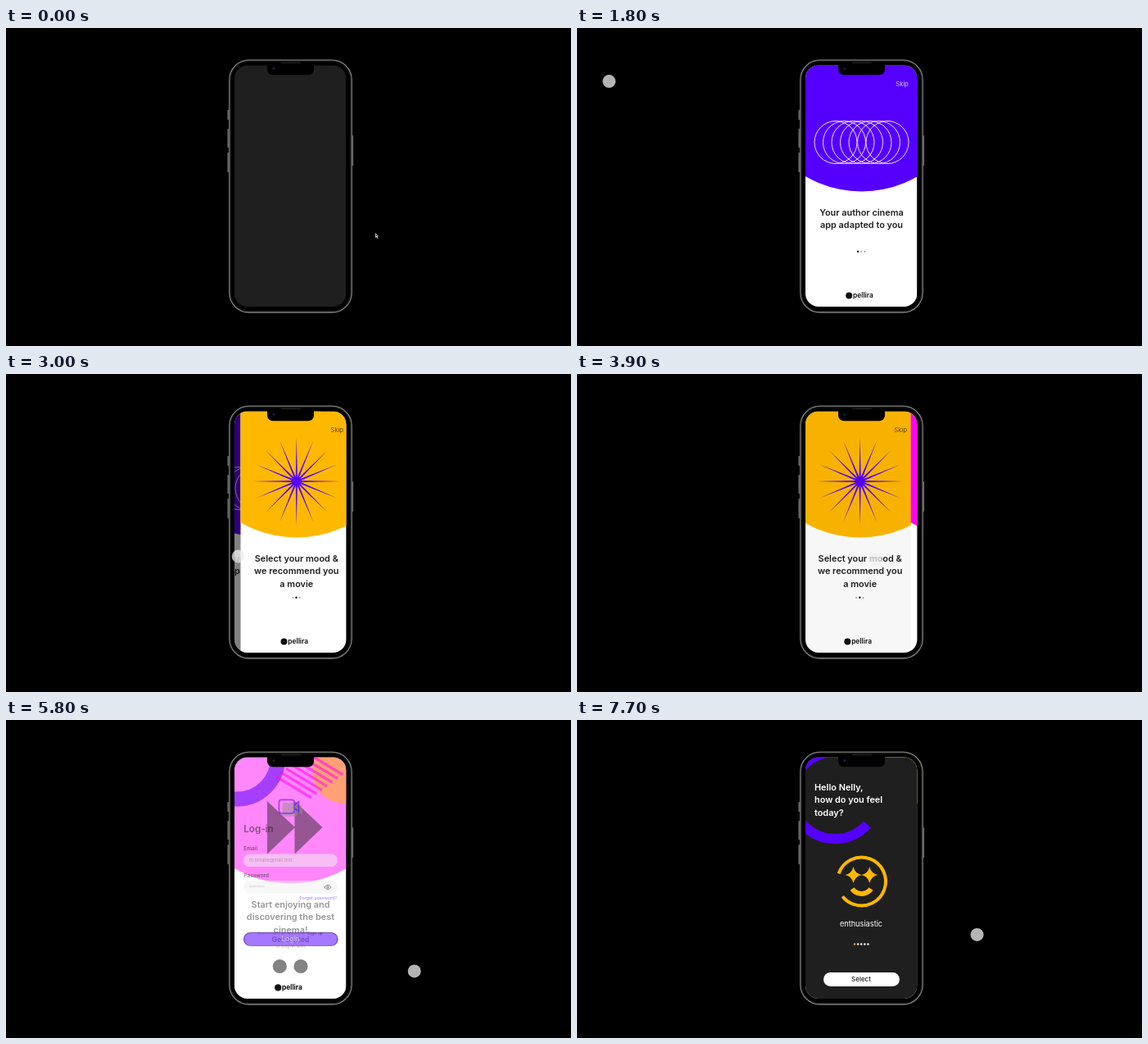
These frames come from a looping animation (690x388 px, 8 s). An HTML page with a canvas:

```html
<!DOCTYPE html>
<html lang="en">
<head>
<meta charset="utf-8">
<title>App walkthrough</title>
<style>
html, body { margin: 0; width: 100%; height: 100%; overflow: hidden; background: #000; }
canvas { display: block; width: 690px; height: 388px; }
</style>
</head>
<body>
<canvas id="stage"></canvas>
<script>
const canvas = document.getElementById('stage');
const c = canvas.getContext('2d');
const dpr = window.devicePixelRatio || 1;
canvas.width = 690 * dpr;
canvas.height = 388 * dpr;

const LOOP = 8000, MID = 347.5, BRAND = 'pellira';
const DARK = '#1f1f1f', VIOLET = '#5500ff', YELLOW = '#ffb800', PINK = '#ff00f5';
const SCREEN = { x: 279, y: 45.5, w: 136.4, h: 294.5 };

const clamp = v => Math.min(1, Math.max(0, v));
const lerp = (a, b, p) => a + (b - a) * p;
const smooth = v => { v = clamp(v); return v * v * (3 - 2 * v); };
const easeOut = v => 1 - (1 - clamp(v)) ** 2;
const rad = deg => deg * Math.PI / 180;
const grey = v => `rgb(${Math.round(v)},${Math.round(v)},${Math.round(v)})`;

function text(str, x, y, size, { color = DARK, weight = 500, align = 'center' } = {}) {
  c.font = `${weight} ${size}px Inter, sans-serif`;
  c.textAlign = align;
  c.fillStyle = color;
  c.fillText(str, x, y + size * 0.36);
}
function heading(list, x, y, style) {
  list.forEach((s, i) => text(s, x, y + i * 15.8, 10.9, { weight: 600, ...style }));
}
function disc(x, y, r, color) {
  c.beginPath();
  c.arc(x, y, r, 0, 7);
  c.fillStyle = color;
  c.fill();
}
function arc(x, y, r, from, to, width, color) {
  c.beginPath();
  c.arc(x, y, r, rad(from), rad(to));
  c.lineWidth = width;
  c.strokeStyle = color;
  c.stroke();
}
function box(x, y, w, h, r, fill, stroke, width = 1) {
  c.beginPath();
  c.roundRect(x, y, w, h, r);
  if (fill) { c.fillStyle = fill; c.fill(); }
  if (stroke) { c.lineWidth = width; c.strokeStyle = stroke; c.stroke(); }
}
function poly(points, fill) {
  c.beginPath();
  points.forEach(([x, y]) => c.lineTo(x, y));
  c.closePath();
  c.fillStyle = fill;
  c.fill();
}
function star(x, y, tips, outer, inner, fill) {
  const pts = [];
  for (let i = 0; i < tips * 2; i++) {
    const a = Math.PI * i / tips, r = i % 2 ? inner : outer;
    pts.push([x + r * Math.cos(a), y + r * Math.sin(a)]);
  }
  poly(pts, fill);
}
function faded(alpha, draw) {
  if (alpha <= 0) return;
  c.save();
  c.globalAlpha = Math.min(1, alpha);
  draw();
  c.restore();
}
function fillScreen(color) {
  c.fillStyle = color;
  c.fillRect(SCREEN.x, SCREEN.y, SCREEN.w, SCREEN.h);
}

// Onboarding pages
const dome = color => disc(MID, 62.4, 137, color);
const skip = color => text('Skip', 397, 68.5, 7.8, { color, weight: 300 });
function dots(active) {
  for (let i = 0; i < 3; i++) disc(343 + i * 4.2, 272.8, i === active ? 1.2 : 0.9, i === active ? '#111' : '#888');
}
function footer() {
  disc(332.2, 326.5, 4, '#111');
  text(BRAND, 337, 326.3, 8.4, { weight: 600, color: '#111', align: 'left' });
}

function circlesPage() {
  dome(VIOLET);
  skip('#fff');
  for (let i = 0; i < 7; i++) arc(316 + i * 10.5, 139.5, 26, 0, 360, 0.9, '#fff');
  heading(['Your author cinema', 'app adapted to you'], MID, 224.7);
  dots(0);
}
function burstPage() {
  fillScreen('#fff');
  dome(YELLOW);
  skip('#3a2a00');
  star(MID, 131, 16, 54, 5.5, VIOLET);
  heading(['Select your mood &', 'we recommend you', 'a movie'], MID, 224.7);
  dots(1);
  footer();
}
function forwardPage() {
  fillScreen('#fff');
  dome(PINK);
  for (const x of [319, 352.5]) poly([[x, 99], [x + 34, 131], [x, 163.5]], DARK);
  heading(['Start enjoying and', 'discovering the best', 'cinema!'], MID, 224.7);
  box(290.5, 259.5, 114.5, 16, 8, '#fff', '#111', 1.2);
  text('Get started', MID, 267.7, 8.4, { weight: 600 });
  footer();
}

// Log-in page
function camera() {
  const body = (x, y) => {
    c.beginPath();
    c.roundRect(x, y, 18.5, 16.5, 3);
    c.moveTo(x + 18.5, y + 6.5);
    c.lineTo(x + 24, y + 2);
    c.lineTo(x + 24, y + 14.5);
    c.lineTo(x + 18.5, y + 10);
  };
  body(337.5, 101);
  c.fillStyle = '#929292';
  c.fill();
  body(333.5, 97.3);
  c.lineWidth = 1.7;
  c.lineJoin = 'round';
  c.strokeStyle = VIOLET;
  c.stroke();
}
function eye(x, y) {
  c.beginPath();
  c.moveTo(x - 4, y);
  c.quadraticCurveTo(x, y - 5.6, x + 4, y);
  c.quadraticCurveTo(x, y + 5.6, x - 4, y);
  c.lineWidth = 0.9;
  c.strokeStyle = '#222';
  c.stroke();
  arc(x, y, 1.3, 0, 360, 0.9, '#222');
}
function stripes() {
  c.lineWidth = 3.4;
  c.strokeStyle = PINK;
  for (let i = 0; i < 7; i++) {
    const x = 329 + i * 6.4, y = 68.5 - i * 4.7;
    c.beginPath();
    c.moveTo(x, y);
    c.lineTo(x + 44, y + 26.5);
    c.stroke();
  }
}
function field(label, y) {
  text(label, 290.3, y - 14.2, 6.5, { align: 'left', weight: 600 });
  box(290, y - 7.75, 115, 15.5, 7.75, '#f0f0f0');
}
function loginPage(buttonY) {
  const note = { color: '#777', weight: 400 };
  arc(282, 46.5, 50, 0, 180, 18, VIOLET);
  disc(413, 63, 39, YELLOW);
  stripes();
  camera();
  text('Log-in', 290.3, 133, 11.6, { align: 'left', weight: 600 });
  field('Email', 171.2);
  text('m.orvane@mail.test', 297, 171.2, 5.6, { ...note, align: 'left' });
  field('Password', 203.7);
  for (let i = 0; i < 8; i++) disc(298 + i * 2.4, 203, 0.75, '#888');
  eye(393, 204);
  text('Forget password?', 404, 217.5, 5.4, { align: 'right', color: VIOLET, weight: 400 });
  text('Don\u2019t have an account?', 366, 260, 5.3, { ...note, align: 'right' });
  text('Sign up', 367.8, 260, 5.4, { align: 'left', color: '#111' });
  text('or Log-in with', MID, 276.3, 5.4, note);
  box(290, buttonY - 8, 115.5, 16, 8, VIOLET);
  text('Login', MID, buttonY, 8.4, { color: '#fff', weight: 600 });
  disc(334.3, 300.5, 8.6, '#161616');
  disc(360, 300.5, 8.6, '#161616');
}

// Mood picker
function sparkle(x, y, r) {
  c.beginPath();
  c.moveTo(x + r, y);
  for (let k = 1; k < 5; k++) {
    const a = k * Math.PI / 2, m = a - Math.PI / 4;
    c.quadraticCurveTo(x + r / 4 * Math.cos(m), y + r / 4 * Math.sin(m), x + r * Math.cos(a), y + r * Math.sin(a));
  }
  c.fillStyle = YELLOW;
  c.fill();
}
function moodPage() {
  fillScreen(DARK);
  arc(315, 92, 53, 42, 270, 12, VIOLET);
  heading(['Hello Nelly,', 'how do you feel', 'today?'], 290, 81.7, { color: '#fff', align: 'left' });
  arc(MID, 197, 29.5, 199, 502, 4, YELLOW);
  sparkle(337.5, 189, 10);
  sparkle(357.3, 189, 10);
  arc(MID, 198, 14, 35, 145, 6, YELLOW);
  text('enthusiastic', 347, 249, 9.2, { color: '#fff', weight: 400 });
  for (let i = 0; i < 5; i++) disc(339 + i * 4.1, 273.5, 1.2, i ? '#fff' : '#ff9a3c');
  box(301, 308, 93, 17, 8.5, '#fff');
  text('Select', 347, 316.5, 8);
}

// The logo travels from the centre to the foot of the first page.
function splash(t) {
  const p = smooth((t - 890) / 330);
  fillScreen(grey(lerp(31, 255, p)));
  faded(p * 1.4, circlesPage);
  const color = grey(lerp(255, 17, smooth(p * 1.6 - 0.6)));
  faded((t - 100) / 250, () => {
    disc(lerp(346, 332.2, p), lerp(192, 326.5, p), lerp(12, 4, p), color);
    text(BRAND, lerp(329, 337, p), lerp(213, 326.3, p), lerp(12, 8.4, p), { color, weight: 600, align: 'left' });
  });
}

// The old page trails and darkens while the next one slides over it.
function slide(p, from, to) {
  const page = (dx, draw) => {
    c.save();
    c.translate(dx, 0);
    c.beginPath();
    c.rect(SCREEN.x, SCREEN.y, SCREEN.w, SCREEN.h);
    c.clip();
    draw();
    c.restore();
  };
  if (p < 1) page(-p * SCREEN.w * 0.24, () => {
    from();
    fillScreen(`rgba(0,0,0,${0.52 * p})`);
  });
  if (p > 0) page((1 - p) * SCREEN.w, to);
}

function logIn(t) {
  const p = smooth((t - 5650) / 290);
  fillScreen('#fff');
  faded(1 - p, forwardPage);
  faded(p, () => loginPage(lerp(267.3, 243.2, smooth((t - 5800) / 100))));
  footer();
}

function screen(t) {
  if (t < 2655) splash(t);
  else if (t < 3888) slide(easeOut((t - 2655) / 450), () => splash(2000), burstPage);
  else if (t < 5600) slide(easeOut((t - 3888) / 450), burstPage, forwardPage);
  else {
    logIn(t);
    faded(smooth((t - 7420) / 270), moodPage);
  }
}

function phone(t) {
  for (const [y, h] of [[100, 12], [123, 23], [152, 24]]) box(270.3, y, 2.4, h, 0.8, '#5c5c5a');
  box(421.8, 131, 2.4, 37, 0.8, '#5c5c5a');
  box(272.8, 39.2, 149.4, 307.8, 24, '#000', '#82827f', 1.3);
  box(274.4, 40.8, 146.2, 304.6, 22.5, null, '#232323', 0.8);
  c.save();
  c.beginPath();
  c.roundRect(SCREEN.x, SCREEN.y, SCREEN.w, SCREEN.h, 16);
  c.clip();
  screen(t);
  c.restore();
  box(319, 44, 57, 13.3, [0, 0, 7, 7], '#000');
  box(336, 41.6, 24, 1.6, 0.8, '#1c1c1c');
  disc(327, 49.5, 2.2, '#0b0d1c');
  disc(327, 49.5, 1.1, '#1d2550');
}

// Touch moves: start, end, x, y; the marker rests in between.
const MOVES = [
  [50, 390, -14, 40], [1750, 2500, 391, 231], [2620, 3100, 279, 222], [3300, 3700, 389, 227],
  [3850, 4400, 252, 226], [4700, 5250, 357, 292], [5250, 5400, 357, 272],
  [5600, 5830, 501, 307], [6450, 7300, 368, 246], [7400, 7720, 489, 262]
];
function marker(t) {
  if (t < 100) return pointer(451, 250);
  let x = 451, y = 256;
  for (const [from, to, toX, toY] of MOVES) {
    const p = easeOut((t - from) / (to - from));
    x = lerp(x, toX, p);
    y = lerp(y, toY, p);
  }
  disc(x, y, 8, 'rgba(240,240,240,0.75)');
}
function pointer(x, y) {
  poly([[x, y], [x, y + 6], [x + 1.4, y + 5], [x + 2.6, y + 7], [x + 3.2, y + 6.5], [x + 2.4, y + 4.5], [x + 4, y + 4.3]], '#ddd');
  poly([[x + 0.8, y + 1.8], [x + 0.8, y + 4.2], [x + 2.6, y + 3.6]], '#222');
}

const start = performance.now();
function frame(now) {
  const t = Math.max(0, now - start) % LOOP;
  c.setTransform(dpr, 0, 0, dpr, 0, 0);
  c.fillStyle = '#000';
  c.fillRect(0, 0, 690, 388);
  phone(t);
  marker(t);
  requestAnimationFrame(frame);
}
requestAnimationFrame(frame);
</script>
</body>
</html>
```
